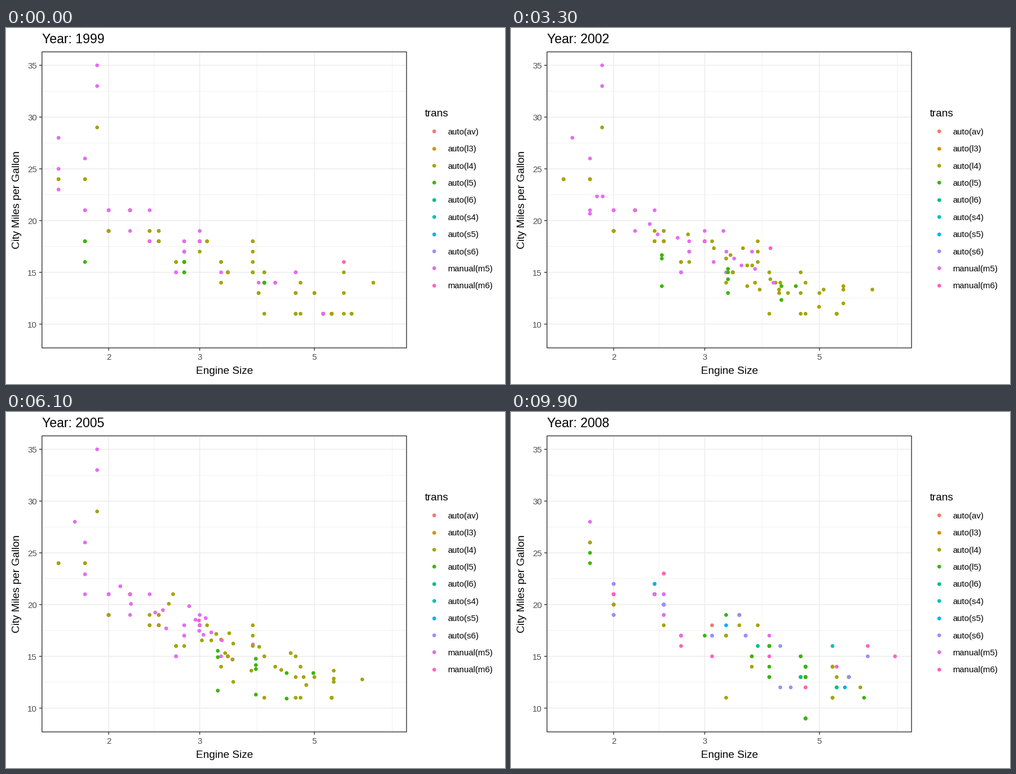
Recreate the animation shown at these times as a matplotlib script. Size 885 px wide and 632 px high, loop 10 s.

```python
from collections import defaultdict

import matplotlib.pyplot as plt
import numpy as np
from matplotlib.animation import FuncAnimation
from matplotlib.patches import Rectangle

W, H, DPI = 885, 632, 128
PX = 72 / DPI                                   # points per pixel
LEFT, RIGHT, TOP, BOTTOM = 63.8, 710.4, 42.4, 567.9
FRAMES = 100
DOT = (6.7 * PX) ** 2

AV, L3, L4, L5, L6, S4, S5, S6, M5, M6 = TRANS = [
    "auto(av)", "auto(l3)", "auto(l4)", "auto(l5)", "auto(l6)",
    "auto(s4)", "auto(s5)", "auto(s6)", "manual(m5)", "manual(m6)"]
COLORS = dict(zip(TRANS, [
    "#F8766D", "#D89000", "#A3A500", "#39B600", "#00BF7D",
    "#00BFC4", "#00B0F6", "#9590FF", "#E76BF3", "#FF62BC"]))

# (transmission, engine size, city mileage), in drawing order
OLD_A = [
    (L5, 1.8, 18), (M5, 1.8, 21), (L5, 2.8, 16), (M5, 2.8, 18), (M5, 1.8, 18),
    (L5, 1.8, 16), (L5, 2.8, 15), (M5, 2.8, 17), (L5, 2.8, 15), (L4, 5.7, 13),
    (M6, 5.7, 16), (L4, 5.7, 15), (L4, 5.7, 11), (L4, 6.5, 14), (L4, 2.4, 19),
    (L4, 3.1, 18), (L3, 2.4, 18), (L4, 3.0, 17), (L4, 3.3, 16), (L4, 3.3, 16),
    (L4, 3.8, 15), (L4, 3.8, 15), (L4, 3.9, 13), (M5, 3.9, 14), (M5, 5.2, 11),
    (L4, 5.2, 11), (L4, 3.9, 13), (L4, 5.2, 11), (L4, 5.9, 11), (L4, 5.2, 11),
    (M5, 5.2, 11), (L4, 5.9, 11), (L4, 4.6, 11), (L4, 5.4, 11), (L5, 4.0, 14),
    (M5, 4.0, 15), (L5, 4.0, 14), (L4, 5.0, 13), (L4, 4.2, 14), (M5, 4.2, 14),
    (M5, 4.6, 13), (L4, 4.6, 13), (L4, 5.4, 11), (M5, 3.8, 18), (L4, 3.8, 18),
    (L4, 4.6, 15), (M5, 4.6, 15), (M5, 1.6, 28), (L4, 1.6, 24), (M5, 1.6, 25),
    (M5, 1.6, 23), (L4, 1.6, 24), (L4, 2.4, 18), (M5, 2.4, 18), (L4, 2.5, 18),
    (M5, 2.5, 18), (L4, 2.0, 19), (M5, 2.0, 19)]
OLD_B = [
    (L4, 4.0, 15), (L4, 4.7, 14), (L4, 4.0, 11), (L4, 4.6, 11), (L4, 5.4, 11),
    (L4, 5.4, 11), (L5, 4.0, 14), (L4, 5.0, 13), (M5, 2.4, 21), (L4, 2.4, 19),
    (L4, 3.0, 18), (M5, 3.0, 19), (L4, 3.3, 14), (M5, 3.3, 15), (L4, 3.1, 18),
    (L4, 3.8, 16), (L4, 3.8, 17), (M5, 2.5, 18), (L4, 2.5, 18), (L4, 2.2, 21),
    (M5, 2.2, 19), (M5, 2.5, 19), (L4, 2.5, 19), (M5, 2.7, 15), (L4, 2.7, 16),
    (L4, 3.4, 15), (M5, 3.4, 15), (M5, 2.2, 21), (L4, 2.2, 21), (L4, 3.0, 18),
    (M5, 3.0, 18), (L4, 2.2, 21), (M5, 2.2, 21), (L4, 3.0, 18), (M5, 3.0, 18),
    (L3, 1.8, 24), (L4, 1.8, 24), (M5, 1.8, 26), (L4, 4.7, 11), (M5, 2.7, 15),
    (L4, 2.7, 16), (M5, 3.4, 15), (L4, 3.4, 15), (M5, 2.0, 21), (L4, 2.0, 19),
    (M5, 2.8, 17), (M5, 1.9, 33), (M5, 2.0, 21), (L4, 2.0, 19), (L4, 2.8, 16),
    (M5, 2.8, 17), (M5, 1.9, 35), (L4, 1.9, 29), (M5, 2.0, 21), (L4, 2.0, 19),
    (M5, 1.8, 21), (L5, 1.8, 18), (L5, 2.8, 16), (M5, 2.8, 18)]
NEW_A = [
    (M6, 2.0, 20), (AV, 2.0, 21), (AV, 3.1, 18), (M6, 2.0, 20), (S6, 2.0, 19),
    (S6, 3.1, 17), (M6, 3.1, 15), (S6, 3.1, 17), (S6, 4.2, 16), (L4, 5.3, 14),
    (L4, 5.3, 11), (L4, 5.3, 14), (L4, 6.0, 12), (M6, 6.2, 16), (S6, 6.2, 15),
    (M6, 7.0, 15), (L4, 5.3, 14), (L4, 5.3, 11), (L4, 2.4, 22), (L4, 3.5, 18),
    (S6, 3.6, 17), (L4, 3.3, 17), (L4, 3.3, 17), (L4, 3.3, 11), (L6, 3.8, 16),
    (L6, 4.0, 16), (M6, 3.7, 15), (L4, 3.7, 14), (L5, 4.7, 14), (L5, 4.7, 14),
    (L5, 4.7, 9), (L5, 4.7, 13), (L5, 4.7, 9), (L5, 4.7, 13), (L5, 5.7, 13),
    (M6, 4.7, 12), (L5, 4.7, 9), (L5, 4.7, 13), (L5, 4.7, 13), (M6, 4.7, 12),
    (M6, 4.7, 9), (L5, 5.7, 13), (L6, 5.4, 12), (L5, 4.0, 13), (L6, 4.6, 13),
    (L4, 4.6, 13), (L4, 5.4, 13), (M5, 4.0, 17), (L5, 4.0, 16), (M5, 4.6, 15),
    (L5, 4.6, 15), (M6, 5.4, 14), (M5, 1.8, 26), (L5, 1.8, 25), (L5, 1.8, 24),
    (M6, 2.0, 21), (L4, 2.4, 21), (M5, 2.4, 21), (L5, 3.3, 19)]
NEW_B = [
    (M5, 2.0, 20), (L4, 2.0, 20), (L4, 2.7, 17), (M6, 2.7, 16), (M5, 2.7, 17),
    (L5, 3.0, 17), (L5, 3.7, 15), (L5, 4.7, 9), (L5, 4.7, 14), (L5, 5.7, 13),
    (L5, 6.1, 11), (S6, 4.2, 12), (S6, 4.4, 12), (L6, 5.4, 12), (L5, 4.0, 13),
    (L6, 4.6, 13), (AV, 2.5, 23), (M6, 2.5, 23), (M6, 3.5, 19), (AV, 3.5, 19),
    (AV, 3.5, 19), (L5, 4.0, 14), (S5, 5.6, 12), (L4, 3.8, 18), (S4, 5.3, 16),
    (M5, 2.5, 20), (M5, 2.5, 19), (L4, 2.5, 20), (L4, 2.5, 18), (S4, 2.5, 20),
    (S4, 2.5, 20), (M5, 2.5, 19), (M5, 2.5, 20), (L5, 4.0, 16), (L5, 4.7, 14),
    (M5, 2.4, 21), (L5, 2.4, 21), (S6, 3.5, 19), (M5, 2.4, 21), (S5, 2.4, 22),
    (S5, 3.3, 18), (M5, 1.8, 28), (L4, 1.8, 26), (S6, 5.7, 13), (M5, 2.7, 17),
    (M6, 4.0, 15), (L5, 4.0, 16), (M6, 2.0, 21), (S6, 2.0, 22), (S6, 2.0, 22),
    (M6, 2.0, 21), (S6, 2.5, 21), (M5, 2.5, 21), (M5, 2.5, 20), (S6, 2.5, 20),
    (S6, 2.0, 19), (M6, 2.0, 21), (S6, 3.6, 17)]


def px(size):
    lo, span = np.log(1.6), np.log(7 / 1.6)
    return LEFT + (RIGHT - LEFT) * ((np.log(size) - lo) / span + 0.05) / 1.1


def py(mpg):
    return BOTTOM - (BOTTOM - TOP) * ((mpg - 9) / 26 + 0.05) / 1.1


def place(rows):
    return np.array([(px(x), py(y)) for _, x, y in rows])


def tint(rows):
    return [COLORS[row[0]] for row in rows]


def pair(old, new):
    """The nth row of a transmission moves to its nth later row, or stays."""
    queues = defaultdict(list)
    for row in new:
        queues[row[0]].append(row)
    return [queues[row[0]].pop(0) if queues[row[0]] else row for row in old]


old, new = OLD_A + OLD_B, NEW_A + NEW_B
start, goal, final = place(old), place(pair(old, new)), place(new)
old_tint, new_tint = tint(old), tint(new)

plt.rcParams["font.family"] = "Liberation Sans"
fig = plt.figure(figsize=(W / DPI, H / DPI), dpi=DPI, facecolor="white")
ax = fig.add_axes([0, 0, 1, 1])
ax.set(xlim=(0, W), ylim=(H, 0))
ax.axis("off")


def line(x, y, color, width, z):
    ax.plot(x, y, color=color, lw=width * PX, zorder=z,
            solid_capstyle="butt", snap=False)


def label(x, y, text, size, color="black", **kw):
    return ax.text(x, y, text, fontsize=size * PX, color=color,
                   va="baseline", **kw)


GRID, EDGE, TICK_TEXT = "#EBEBEB", "#333333", "#4D4D4D"
for x in np.sqrt([6, 15, 50]):
    line([px(x)] * 2, [TOP, BOTTOM], GRID, 0.7, 1)
for y in np.arange(12.5, 35, 5):
    line([LEFT, RIGHT], [py(y)] * 2, GRID, 0.7, 1)
for x in (2, 3, 5):
    line([px(x)] * 2, [TOP, BOTTOM], GRID, 1.4, 2)
    line([px(x)] * 2, [BOTTOM, BOTTOM + 4.8], EDGE, 1.4, 2)
    label(px(x), 589, str(x), 15, TICK_TEXT, ha="center")
for y in range(10, 36, 5):
    line([LEFT, RIGHT], [py(y)] * 2, GRID, 1.4, 2)
    line([LEFT - 4.8, LEFT], [py(y)] * 2, EDGE, 1.4, 2)
    label(55, py(y) + 6, str(y), 15, TICK_TEXT, ha="right")
ax.add_patch(Rectangle((LEFT, TOP), RIGHT - LEFT, BOTTOM - TOP, fill=False,
                       ec=EDGE, lw=1.4 * PX, zorder=4, snap=False))

label((LEFT + RIGHT) / 2, 614, "Engine Size", 19, ha="center")
ax.text(24, (TOP + BOTTOM) / 2, "City Miles per Gallon", fontsize=19 * PX,
        rotation=90, rotation_mode="anchor", ha="center", va="baseline")
title = label(64, 27, "", 23)

label(743, 157, "trans", 19)
for k, name in enumerate(TRANS):
    y = 183.2 + 30.4 * k
    ax.scatter(758.5, y, s=DOT, color=COLORS[name], lw=0)
    label(783, y + 5.7, name, 15)

dots = ax.scatter(*start.T, s=DOT, c=old_tint, lw=0, zorder=3)


def update(i):
    t = i / (FRAMES - 1)
    last = i == FRAMES - 1
    dots.set_offsets(final if last else start + (goal - start) * t)
    dots.set_facecolors(new_tint if last else old_tint)
    title.set_text(f"Year: {round(1999 + 9 * t)}")
    return dots, title


anim = FuncAnimation(fig, update, frames=FRAMES, interval=100,
                     repeat=True, repeat_delay=0, blit=False)
plt.show()
```
